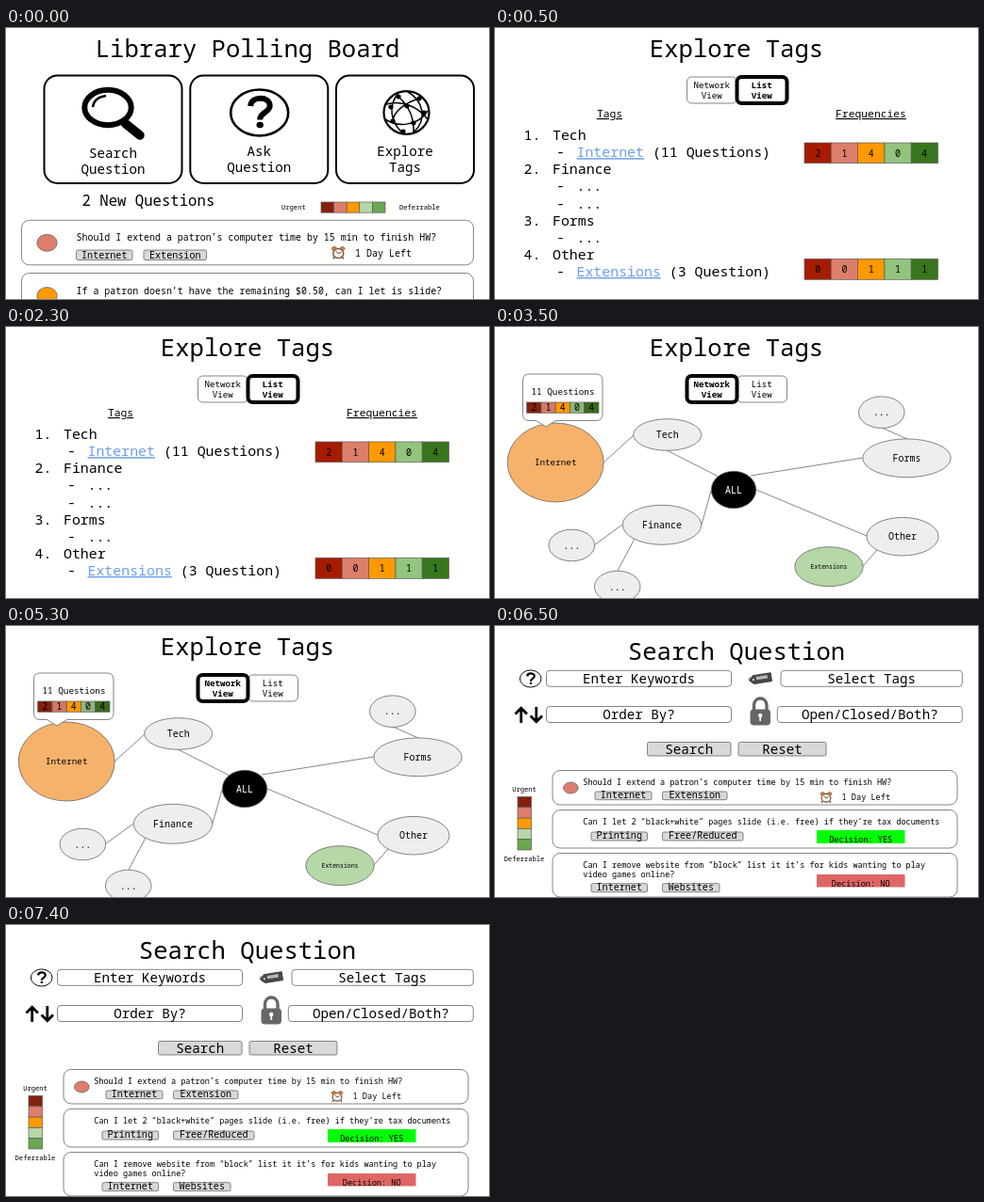
An HTML page for the animation above (8 s loop, 512 by 288 pixels).

```html
<!DOCTYPE html>
<html lang="en">
<head>
<meta charset="utf-8">
<title>Library Polling Board</title>
<style>
html, body { margin: 0; width: 100%; height: 100%; overflow: hidden; background: #fff; }
svg { display: block; width: 100vw; height: 100vh; }
text { font-family: "Roboto Mono", "Noto Sans Mono", "DejaVu Sans Mono", monospace; white-space: pre; }
</style>
</head>
<body>
<svg id="stage" viewBox="0 0 512 288" xmlns="http://www.w3.org/2000/svg"></svg>
<script>
const LOOP = 8000;
const GRAY = '#eeeeee', LINE = '#666';
const URGENCY = ['#85200c', '#dd7e6b', '#ff9900', '#b6d7a8', '#6aa84f'];
const HEAT = ['#a61c00', '#dd7e6b', '#ff9900', '#93c47d', '#38761d'];
const HEAT_DARK = ['#85200c', '#d27a66', '#ff9900', '#8fb57b', '#3a6a1b'];

// Drawing helpers; boxes are given by their edges
const text = (s, x, y, size, extra = '') =>
  `<text x="${x}" y="${y}" font-size="${size}" ${extra}>${s}</text>`;
const mid = (s, x, y, size, extra = '') => text(s, x, y, size, 'text-anchor="middle" ' + extra);
const box = (x1, y1, x2, y2, r = 0, fill = '#fff', stroke = LINE, w = 0.8) =>
  `<rect x="${x1}" y="${y1}" width="${x2 - x1}" height="${y2 - y1}" rx="${r}" fill="${fill}" stroke="${stroke}" stroke-width="${w}"/>`;
const oval = (x, y, rx, ry, fill = GRAY, stroke = LINE, w = 0.8) =>
  `<ellipse cx="${x}" cy="${y}" rx="${rx}" ry="${ry}" fill="${fill}" stroke="${stroke}" stroke-width="${w}"/>`;
const path = (d, w = 1, stroke = '#000', fill = 'none') =>
  `<path d="${d}" fill="${fill}" stroke="${stroke}" stroke-width="${w}"/>`;
const place = (x, y, s, body) => `<g transform="translate(${x} ${y}) scale(${s})">${body}</g>`;

const title = (s, y) => mid(s, 256, y, 25.6);
const tag = (s, x1, y1, x2, y2) =>
  box(x1, y1, x2, y2, 1.6, '#d9d9d9') + mid(s, (x1 + x2) / 2, y2 - 1.6, 10.1);
const field = (s, x1, y1, x2) =>
  box(x1, y1, x2, y1 + 17, 3.5) + mid(s, (x1 + x2) / 2, y1 + 13.8, 14.2);
const button = (s, x1, x2) =>
  box(x1, 123.5, x2, 138, 1.8, '#d9d9d9') + mid(s, (x1 + x2) / 2, 136, 14.2);

function cells(x, y, w, h, colors, nums = '') {
  return colors.map((c, i) => box(x + i * w, y, x + (i + 1) * w, y + h, 0, c, '#595959', 0.7) +
    (nums ? mid(nums[i], x + (i + 0.5) * w, y + h / 2 + 3.7, 10) : '')).join('');
}

function toggle(active) {
  const names = ['Network', 'List'];
  const part = i => {
    const on = i === active, x = 203 + i * 53, bold = on ? 'font-weight="700"' : '';
    return box(x + 0.5, 52, x + 53.5, 80, 5, '#fff', on ? '#000' : LINE, on ? 4 : 0.8) +
      mid(names[i], x + 26.7, 63.8, 9.2, bold) + mid('View', x + 26.7, 74.8, 9.2, bold);
  };
  return part(1 - active) + part(active);
}

// Icons
const question = oval(0, 0, 30.5, 24.5, '#fff', '#000', 2.6) +
  path('M-9.5-7C-9-18 11-18 11-7.5C11 0 0.5-1 0.5 7.5', 6) + oval(0.5, 13, 3.7, 3.2, '#000', 'none');
const magnifier = oval(108, 84.5, 24.7, 18.7, '#fff', '#000', 6) +
  path('M123 98L128 102', 6) +
  `<path d="M126.5 101.5L142 114" stroke="#000" stroke-width="9.5" stroke-linecap="round"/>` +
  path('M92 84C93 76 99 73 106 72', 2.4);
const dots = [[416, 73], [438, 75], [408, 84], [425, 83], [443, 90], [410, 99], [432, 101], [421, 110]];
const globe = oval(424.5, 90, 24, 22.8, '#fff', '#000', 2.2) +
  path('M416 69C405 82 407 100 421 112M425 67C443 78 447 97 432 111M403 81C420 76 437 84 447 97M402 97C416 106 437 104 447 88M416 73C426 82 433 94 432 111M438 75C424 79 411 88 410 99', 1.5) +
  dots.map(([x, y]) => oval(x, y, 2.6, 2.4, '#000', 'none')).join('');
const clock = path('M-4 4L-5 6M4 4L5 6', 1.3, '#6b4a32') +
  oval(-3.9, -4.2, 2.4, 1.8, '#d8894a', '#6b4a32', 0.6) + oval(3.9, -4.2, 2.4, 1.8, '#d8894a', '#6b4a32', 0.6) +
  oval(0, 0.5, 5.1, 4.7, '#f7efe2', '#80583a', 1.3) + path('M-2.2-1.6L0 .7L2.8-.8', 0.8, '#333');
const priceTag = `<g transform="rotate(-9 281 56)">` +
  path('M269.5 56L274 51.5H293V60.5H274Z', 0.7, '#222', '#4a4846') +
  path('M277 55H289', 3.4, '#b9b7b3') + oval(273.8, 56, 1.3, 1.3, '#fff', '#222', 0.5) + '</g>' +
  path('M273 56C267 52 268 60 275 61', 0.7, '#444');
const lock = path('M274.5 92V84.5C274.5 74.5 288 74.5 288 84.5V92', 3.4, '#666') +
  box(270.5, 88.5, 292, 105.5, 4, '#666', 'none') +
  oval(281.2, 95, 2.2, 2.2, '#fff', 'none') + path('M281.2 95V101', 1.8, '#fff');
const arrows = path('M27.7 103V88M21.5 93.5L27.7 87.2L33.9 93.5M43.8 86V101M37.6 95.5L43.8 101.8L50 95.5', 2.8);

const ASKED = 'Should I extend a patron’s computer time by 15 min to finish HW?';

function home() {
  const card = (x, y, a, b, icon) => box(x, 50.5, x + 146, 165, 14, '#fff', '#000', 2) + icon +
    mid(a, x + 73, y, 14.2) + mid(b, x + 73, y + 17, 14.2);
  const row = (y, color, s) => box(16.5, y, 495.5, y + 47.5, 8) +
    oval(43.5, y + 24, 10.7, 9, color) + text(s, 74.5, y + 22, 9.95);
  return title('Library Polling Board', 31) +
    card(40.5, 138, 'Search', 'Question', magnifier) +
    card(195.3, 136, 'Ask', 'Question', place(268.7, 90, 1, question)) +
    card(350, 136, 'Explore', 'Tags', globe) +
    text('2 New Questions', 80.5, 189, 15.65) +
    text('Urgent', 292, 192.5, 7.15) + text('Deferrable', 417, 192.5, 7.15) +
    cells(334, 185, 13.6, 11.2, URGENCY) +
    row(204.3, URGENCY[1], ASKED) +
    tag('Internet', 74.5, 236, 134, 246.5) + tag('Extension', 146, 236, 212.5, 246.5) +
    place(352.3, 239, 1.08, clock) + text('1 Day Left', 370, 243, 10) +
    row(260.5, URGENCY[2], 'If a patron doesn’t have the remaining $0.50, can I let is slide?');
}

function list() {
  const under = 'text-decoration="underline"';
  const link = (s, rest) => `<tspan fill="#6d9eeb" ${under}>${s}</tspan> ${rest}`;
  const groups = [
    ['Tech', link('Internet', '(11 Questions)')],
    ['Finance', '...', '...'],
    ['Forms', '...'],
    ['Other', link('Extensions', '(3 Question)')]
  ];
  let y = 101, out = '';
  groups.forEach(([name, ...items], i) => {
    y += 18.1;
    out += text(i + 1 + '.', 30.5, y, 14.9) + text(name, 61, y, 14.9);
    for (const item of items) {
      y += 18.1;
      out += text('-', 65, y, 14.9) + text(item, 86.5, y, 14.9);
    }
  });
  return title('Explore Tags', 30.6) + toggle(1) +
    mid('Tags', 121.5, 95, 11.35, under) + mid('Frequencies', 398.5, 95, 11.35, under) + out +
    cells(328, 122, 28.3, 21.7, HEAT, '21404') + cells(328, 245.3, 28.3, 22, HEAT, '00111');
}

function network() {
  const edges = 'M115 144L147 115M182 131L237 159M219 210L229 174M271 158L390 139M277 173L394 222' +
    'M410 107L437 119M405 237L390 254M135 210L105 232M148 225L130 259';
  const node = (s, x, y, rx, ry, fill = GRAY, size = 10, ink = '#000') =>
    oval(x, y, rx, ry, fill) + mid(s, x, y + size * 0.37, size, `fill="${ink}"`);
  return title('Explore Tags', 30.6) + toggle(0) + path(edges, 0.8, LINE) +
    node('Internet', 64.2, 144, 51, 42, '#f6b26b', 9.3) +
    node('Tech', 182.7, 114.5, 36, 16.8) +
    node('ALL', 253, 173, 23.7, 19.7, '#000', 10, '#fff') +
    node('Finance', 177, 210.3, 41.7, 21) +
    node('...', 81.3, 232, 24.3, 16.8) + node('...', 129.7, 276, 24.3, 16.8) +
    node('Forms', 436.5, 139.3, 46.7, 20.4) + node('...', 409.8, 90.7, 24.3, 16.8) +
    node('Other', 432, 222.7, 38, 20.3) +
    node('Extensions', 354, 254.7, 36.2, 21, '#b6d7a8', 6.5) +
    path('M36 50H107Q114 50 114 57V92.5Q114 99.5 107 99.5H64.5L54 106L43.5 99.5H36Q29.5 99.5 29.5 92.5V57Q29.5 50 36 50Z', 0.8, LINE, '#fff') +
    mid('11 Questions', 72, 72, 9.3) + cells(33.7, 80, 15.25, 11.3, HEAT_DARK, '21404');
}

function search() {
  const row = (y1, y2, ...lines) => box(61, y1, 490, y2, 8) +
    lines.map((s, i) => text(s, 93.3, y1 + (i ? 25.5 : 15.3), 8.53)).join('');
  const verdict = (s, y, h, fill) => box(341, y, 434.5, y + h, 0, fill, 'none') + mid(s, 387.7, y + 13, 8.6);
  return title('Search Question', 35.6) +
    place(37.7, 56, 0.37, question) + field('Enter Keywords', 54.5, 47.3, 250.5) +
    priceTag + field('Select Tags', 303, 47.3, 495.3) +
    arrows + field('Order By?', 54.5, 85.5, 250.5) +
    lock + field('Open/Closed/Both?', 299.3, 85.5, 495.3) +
    button('Search', 161.5, 250) + button('Reset', 258, 351) +
    mid('Urgent', 31, 176.3, 7.15) + mid('Deferrable', 31, 249.5, 7.15) +
    URGENCY.map((c, i) => cells(24, 181.5 + i * 11.3, 14.5, 11.3, [c])).join('') +
    row(153.5, 190, ASKED) + oval(80.3, 172, 7.8, 6, URGENCY[1]) +
    tag('Internet', 106, 176, 166, 184.7) + tag('Extension', 177.5, 176, 246, 184.7) +
    place(351, 182.3, 0.95, clock) + text('1 Day Left', 367.5, 184.5, 8.6) +
    row(195.5, 236, 'Can I let 2 “black+white” pages slide (i.e. free) if they’re tax documents') +
    tag('Printing', 102, 219, 161.5, 228) + tag('Free/Reduced', 177.5, 219, 263, 228) +
    verdict('Decision: YES', 217, 14, '#00ff00') +
    row(241.5, 288, 'Can I remove website from “block” list it it’s for kids wanting to play', 'video games online?') +
    tag('Internet', 102, 273.7, 161.5, 282.7) + tag('Websites', 177.5, 273.7, 238, 282.7) +
    verdict('Decision: NO', 264, 13.5, '#e06666');
}

// Scene, start, end in ms; every change is a hard cut
const scenes = [
  [home, 0, 500],
  [list, 500, 3500],
  [network, 3500, 6500],
  [search, 6500, LOOP]
];
const stage = document.getElementById('stage');
stage.innerHTML = scenes.map(([draw]) => `<g>${draw()}</g>`).join('');
const groups = [...stage.children];

function show(now) {
  const t = now % LOOP;
  scenes.forEach(([, start, end], i) => {
    groups[i].style.display = t >= start && t < end ? '' : 'none';
  });
}

function tick(now) {
  show(now);
  requestAnimationFrame(tick);
}

show(0);
requestAnimationFrame(tick);
</script>
</body>
</html>
```
